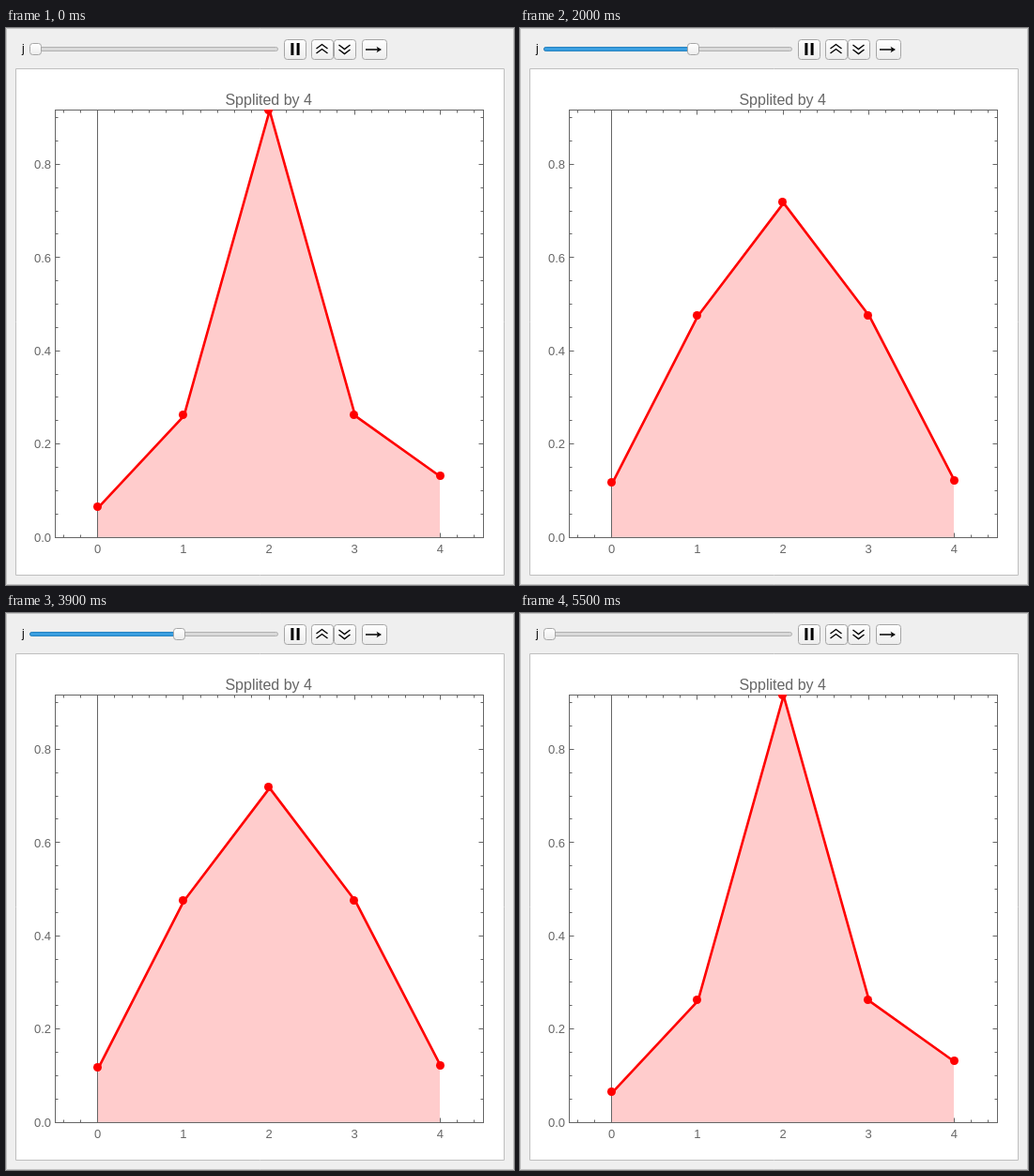
An HTML page with a canvas for the animation above (6000 ms loop, 541 px wide and 594 px high).

```html
<!DOCTYPE html>
<html lang="en">
<head>
<meta charset="utf-8">
<title>Spplited by 4</title>
<style>
  html, body { margin: 0; width: 100%; height: 100%; overflow: hidden; background: #efefef; }
  canvas { display: block; }
</style>
</head>
<body>
<canvas id="stage" width="541" height="594"></canvas>
<script>
const ctx = document.getElementById('stage').getContext('2d');
const GREY = '#666', LEFT = 52.5, RIGHT = 508.5, TOP = 87.5, BOTTOM = 543.5;
const FONT = '"Liberation Sans", Arial, sans-serif';

// Counts per bin: few samples at first, settling on the binomial 1:4:6:4:1
const SAMPLES = [
  { step: -1, counts: [1, 4, 14, 4, 2] },
  { step: 0, counts: [11, 26, 44, 35, 9] },
  { step: 4, counts: [89, 395, 610, 393, 105] },
  { step: 24, counts: [99, 400, 603, 400, 102] }
];

const snap = v => Math.floor(v) + 0.5;
const plotX = v => 97.62 + 91.2 * v;
const plotY = v => 543 - 497 * v;
const easeOut = u => 1 - (1 - u) ** 6;
const normalize = counts => counts.map(c => c / Math.hypot(...counts));

function heights(step) {
  const i = Math.max(1, SAMPLES.findIndex(s => s.step >= step));
  const from = SAMPLES[i - 1], to = SAMPLES[i];
  const f = easeOut((step - from.step) / (to.step - from.step));
  const a = normalize(from.counts), b = normalize(to.counts);
  return a.map((v, n) => v + (b[n] - v) * f);
}

function trace(points) {
  ctx.beginPath();
  points.forEach(([x, y]) => ctx.lineTo(x, y));
}

function polyline(points, color, width) {
  trace(points);
  ctx.strokeStyle = color;
  ctx.lineWidth = width;
  ctx.stroke();
}

function polygon(points, color) {
  trace(points);
  ctx.fillStyle = color;
  ctx.fill();
}

function box(x, y, w, h, radius, fill, border) {
  ctx.beginPath();
  ctx.roundRect(x, y, w, h, radius);
  ctx.fillStyle = fill;
  ctx.fill();
  ctx.strokeStyle = border;
  ctx.lineWidth = 1;
  ctx.stroke();
}

function raised(x, y, w, h) {
  const shade = ctx.createLinearGradient(0, y, 0, y + h);
  shade.addColorStop(0, '#fff');
  shade.addColorStop(1, '#ededed');
  box(x, y, w, h, 3, shade, '#a6a6a6');
}

function label(text, x, y, size, align, color = GREY) {
  ctx.font = `${size}px ${FONT}`;
  ctx.textAlign = align;
  ctx.fillStyle = color;
  ctx.fillText(text, x, y);
}

function drawSlider(step) {
  const thumb = snap(31 + 10.22 * Math.max(step, 0));
  label('j', 17, 26, 12, 'left', '#000');
  box(25.5, 20.5, 264, 4, 2, '#d9d9d9', '#b0b0b0');
  if (step > 0) box(25.5, 20.5, thumb - 25.5, 4, 2, '#3a9fe0', '#2682c0');
  raised(thumb - 6, 16.5, 12, 12);
}

function drawButtons() {
  for (const x of [296.5, 325.5, 349.5]) raised(x, 12.5, 23, 21);
  raised(379.5, 12.5, 26, 21);

  ctx.fillStyle = '#000';
  for (const x of [303.4, 309.6]) ctx.fillRect(x, 16, 3, 13);

  const chevron = (x, y, rise) => polyline([[x - 6, y + rise], [x, y], [x + 6, y + rise]], '#000', 1.4);
  for (const y of [17.5, 22.5]) {
    chevron(336.5, y, 4.5);
    chevron(360.5, y + 5, -4.5);
  }

  polyline([[383, 23], [397, 23]], '#000', 1.5);
  polygon([[400, 23], [394.5, 19.8], [396, 23], [394.5, 26.2]], '#000');
}

function drawFrame() {
  ctx.strokeStyle = GREY;
  ctx.lineWidth = 1;
  ctx.strokeRect(LEFT, TOP, RIGHT - LEFT, BOTTOM - TOP);
  for (let i = -2; i <= 22; i++) {
    const x = snap(plotX(i / 5)), major = i % 5 === 0, size = major ? 5 : 3;
    polyline([[x, TOP], [x, TOP + size]], GREY, 1);
    polyline([[x, BOTTOM], [x, BOTTOM - size]], GREY, 1);
    if (major) label(i / 5, plotX(i / 5), 560, 13, 'center');
  }
  for (let i = 0; i <= 18; i++) {
    const v = i / 20, y = snap(plotY(v)), major = i % 4 === 0, size = major ? 5 : 3;
    polyline([[LEFT, y], [LEFT + size, y]], GREY, 1);
    polyline([[RIGHT, y], [RIGHT - size, y]], GREY, 1);
    if (major) label(v.toFixed(1), 48, Math.round(plotY(v) + 4.8), 13, 'right');
  }
  label('Spplited by 4', 279.7, 82, 16, 'center');
}

function drawCurve(step) {
  const values = heights(step);
  const points = values.map((v, i) => [plotX(i) + 0.7, plotY(v) + 0.9]);
  ctx.save();
  ctx.beginPath();
  ctx.rect(LEFT, 87, RIGHT - LEFT, BOTTOM - 87);
  ctx.clip();
  polygon([[97.5, 543], ...points.slice(0, -1), [462, points[4][1]], [462, 543]], '#fcc');
  polyline([[97.5, TOP], [97.5, BOTTOM]], GREY, 1);
  ctx.lineJoin = 'round';
  polyline(points, '#f00', 2.6);
  ctx.fillStyle = '#f00';
  values.forEach((v, i) => {
    ctx.beginPath();
    ctx.arc(snap(plotX(i) - 0.3), snap(plotY(v)), 4.5, 0, 2 * Math.PI);
    ctx.fill();
  });
  ctx.restore();
}

function draw() {
  const tick = Math.floor(performance.now() % 6000 / 100);
  const step = Math.max(-1, Math.min(tick - 5, 54 - tick));
  box(0.5, 0.5, 540, 593, 0, '#efefef', '#c4c4c4');
  box(10.5, 43.5, 520, 540, 0, '#fff', '#bfbfbf');
  drawSlider(step);
  drawButtons();
  drawFrame();
  drawCurve(step);
  requestAnimationFrame(draw);
}
draw();
</script>
</body>
</html>
```
